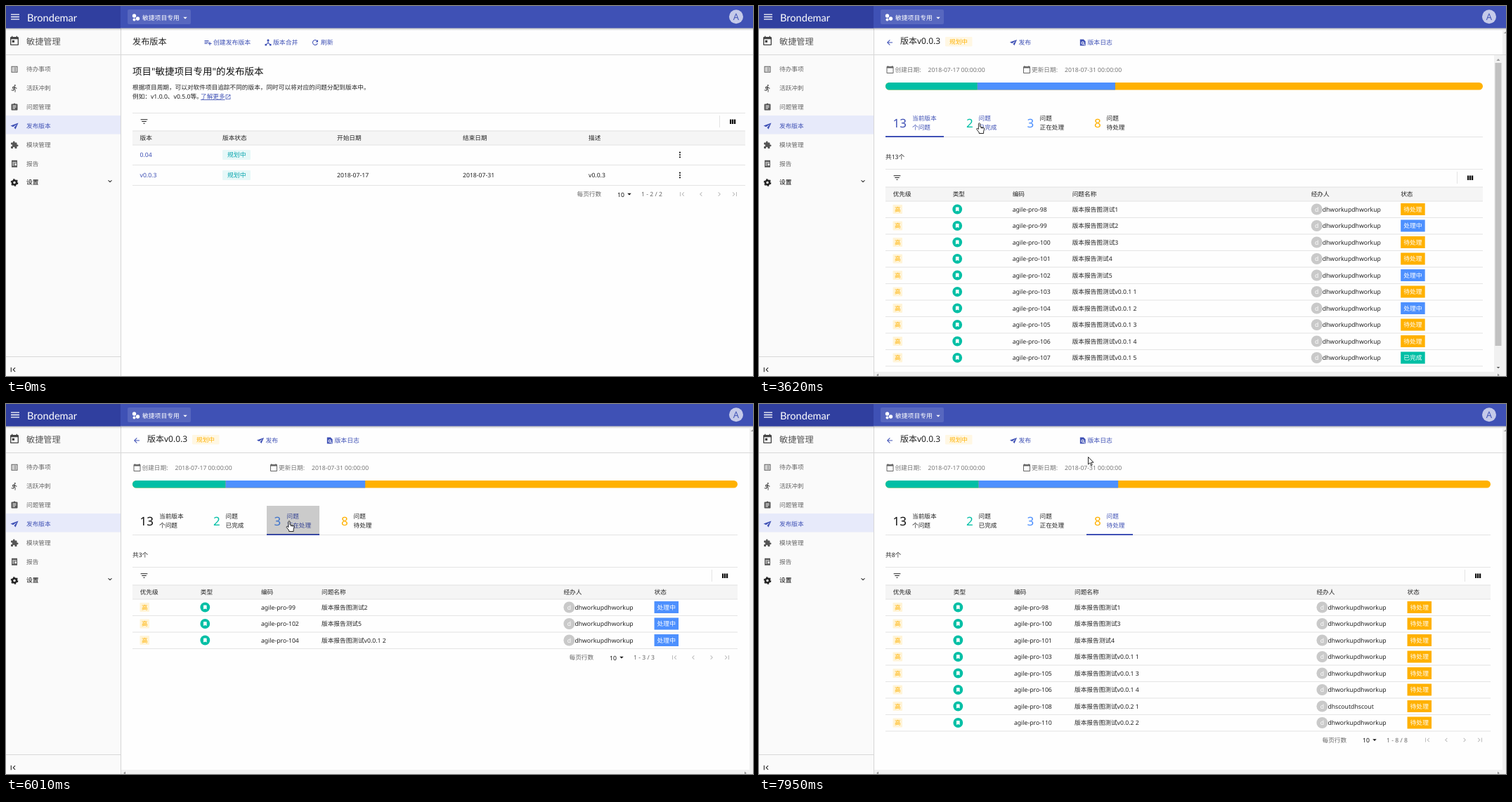
Animation of 1063 by 527 pixels, one loop 8000 ms. Source, as an HTML page:

```html
<!DOCTYPE html>
<html lang="zh-CN">
<head>
<meta charset="utf-8">
<title>发布版本</title>
<style>
html, body { margin: 0; width: 100%; height: 100%; overflow: hidden; background: #fff; }
svg { display: block; width: 1063px; height: 527px; }
text { font-family: "Noto Sans", "Noto Sans CJK SC", "Noto Sans CJK", sans-serif; text-rendering: geometricPrecision; white-space: pre; }
.brand { font-family: Lato, sans-serif; }
</style>
</head>
<body>
<svg id="stage" viewBox="0 0 1063 527"></svg>
<script>
const LOOP = 8000;
const BLUE = '#3f51b5', GREEN = '#00bfa5', SKY = '#4d90fe', AMBER = '#ffb100';
const INK = '#222', GREY = '#666', LINE = '#e4e4e4', OFF = '#bdbdbd';

const ICON = {
  menu: 'M3 18h18v-2H3zM3 13h18v-2H3zM3 6v2h18V6z',
  today: 'M19 3h-1V1h-2v2H8V1H6v2H5c-1.1 0-2 .9-2 2v14c0 1.1.9 2 2 2h14c1.1 0 2-.9 2-2V5c0-1.1-.9-2-2-2zm0 16H5V8h14zM7 10h5v5H7z',
  calendar: 'M20 3h-1V1h-2v2H7V1H5v2H4c-1.1 0-2 .9-2 2v16c0 1.1.9 2 2 2h16c1.1 0 2-.9 2-2V5c0-1.1-.9-2-2-2zm0 18H4V8h16z',
  list: 'M3 3h18v18H3zM5 5v14h14V5zM11 7h6v2h-6zM11 11h6v2h-6zM11 15h6v2h-6zM7 7h2v2H7zM7 11h2v2H7zM7 15h2v2H7z',
  run: 'M13.5 5.5c1.1 0 2-.9 2-2s-.9-2-2-2-2 .9-2 2 .9 2 2 2zm-3.6 13.9l1-4.4 2.1 2v6h2v-7.5l-2.1-2 .6-3c1.3 1.5 3.3 2.5 5.5 2.5v-2c-1.9 0-3.5-1-4.3-2.4l-1-1.6c-.4-.6-1-1-1.7-1-.3 0-.5.1-.8.1L6 8.3V13h2V9.600l1.800-.7-1.600 8.100-4.900-1-.4 2z',
  task: 'M19 3h-4c-.6-1.200-1.700-2-3-2s-2.400.8-3 2H5c-1.100 0-2 .9-2 2v14c0 1.100.9 2 2 2h14c1.100 0 2-.9 2-2V5c0-1.100-.9-2-2-2zM14 17H7v-2h7zM17 13H7v-2h10zM17 9H7V7h10z',
  plane: 'M1 11L23 3 15 21 11 16.500 19 7 8 14.500z',
  puzzle: 'M20.500 11H19V7c0-1.100-.9-2-2-2h-4V3.500a2.500 2.500 0 0 0-5 0V5H4c-1.100 0-2 .9-2 2v3.800h1.500a2.700 2.700 0 0 1 0 5.400H2V20c0 1.100.9 2 2 2h3.800v-1.500a2.700 2.700 0 0 1 5.400 0V22H17c1.100 0 2-.9 2-2v-4h1.500a2.500 2.500 0 0 0 0-5z',
  report: 'M4 2h16v20H4zM6 7v2h12V7zM6 11v2h5v-2zM6 15v2h5v-2zM13 11v6h5v-6z',
  filter: 'M10 18h4v-2h-4zM3 6v2h18V6zM6 13h12v-2H6z',
  columns: 'M4 5h4.500v13H4zM10 5h4.500v13H10zM16 5h4.500v13H16z',
  add: 'M14 10H2v2h12zM14 6H2v2h12zM18 14v-4h-2v4h-4v2h4v4h2v-4h4v-2zM2 16h8v-2H2z',
  merge: 'M17 16l-4-4V8.800a3 3 0 1 0-2 0V12l-4 4H3v5h5v-3l4-4.200 4 4.200v3h5v-5z',
  refresh: 'M17.600 6.400A8 8 0 1 0 19.700 14h-2.100A6 6 0 1 1 16.200 7.800L13 11h7V4z',
  back: 'M20 11H7.800l5.600-5.600L12 4l-8 8 8 8 1.400-1.400L7.800 13H20z',
  open: 'M19 19H5V5h7V3H3v18h18v-9h-2zM14 3v2h3.600L7.800 14.800l1.400 1.400L19 6.400V10h2V3z',
  first: 'M18.400 16.600L13.800 12l4.600-4.600L17 6l-6 6 6 6zM6 6h2v12H6z',
  last: 'M5.600 7.400L10.200 12l-4.600 4.600L7 18l6-6-6-6zM16 6h2v12h-2z',
  prev: 'M15.400 7.400L14 6l-6 6 6 6 1.400-1.400L10.800 12z',
  next: 'M10 6L8.600 7.400 13.200 12l-4.600 4.600L10 18l6-6z',
  expand: 'M16.600 8.600L12 13.200 7.400 8.600 6 10l6 6 6-6z',
  drop: 'M6 9l6 6 6-6z',
  mark: 'M17 3H7c-1.100 0-2 .9-2 2v16l7-3 7 3V5c0-1.100-.9-2-2-2z',
  log: 'M4 2h11l6 6v14H4zM12 9a4.500 4.500 0 1 0 2.500 8.200L18 20.500l1.400-1.400-3.300-3.300A4.500 4.500 0 0 0 12 9zM12 11a2.500 2.500 0 1 1 0 5 2.500 2.500 0 0 1 0-5z'
};

// Markup helpers; text and icons are placed by their vertical centre.
const rect = (x, y, w, h, fill, rx = 0) =>
  `<rect x="${x}" y="${y}" width="${w}" height="${h}" fill="${fill}" rx="${rx}"/>`;
const text = (x, cy, s, fill = INK, size = 8.67, attrs = '') =>
  `<text x="${x}" y="${cy + size * .37}" fill="${fill}" font-size="${size}" ${attrs}>${s}</text>`;
const dot = (x, y, r, fill) => `<circle cx="${x}" cy="${y}" r="${r}" fill="${fill}"/>`;
const icon = (name, cx, cy, size, fill) =>
  `<path d="${ICON[name]}" fill="${fill}" fill-rule="evenodd" transform="translate(${cx - size / 2} ${cy - size / 2}) scale(${size / 24})"/>`;
const center = 'text-anchor="middle"';

function frame() {
  const items = [['list', '待办事项'], ['run', '活跃冲刺'], ['task', '问题管理'], ['plane', '发布版本'],
    ['puzzle', '模块管理'], ['report', '报告']];
  const nav = items.map(([name, label], i) => {
    const y = 90 + i * 26.9, on = i === 3;
    return icon(name, 12, y + .3, 12, on ? BLUE : '#555') + text(29, y, label, on ? BLUE : GREY);
  }).join('');
  const gear = `<g fill="none" stroke="${INK}"><circle cx="12" cy="251.500" r="3" stroke-width="2.600"/>
    <circle cx="12" cy="251.500" r="4.600" stroke-width="1.500" stroke-dasharray="2.400"/></g>`;
  return rect(0, 32, 163, 495, '#fafafa') + rect(0, 156, 163, 26.500, '#e7eafa')
    + icon('today', 12, 50, 16, '#444') + text(29, 50, '敏捷管理', '#555', 12.200)
    + nav + gear + text(29, 251, '设置', '#000') + icon('expand', 148, 249.500, 11, '#000')
    + rect(0, 499, 163, 1, '#d8d8d8') + icon('first', 10, 518, 13, '#222')
    + rect(163, 32, 1, 495, '#d6d6d6') + rect(0, 69, 1063, 1, '#d8d8d8')
    + rect(0, 31, 1063, 4, 'url(#shade)') + rect(0, 0, 1063, 31.500, BLUE) + rect(0, 0, 163, 31.500, '#303f9f')
    + icon('menu', 13, 15.500, 16, '#fff') + text(30, 16.500, 'Brondemar', '#fff', 14.600, 'class="brand"')
    + rect(173, 5, 90, 21, '#5767bf', 2)
    + dot(182.500, 14, 2.700, '#fff') + dot(182.500, 19.500, 2, '#fff') + dot(187.500, 18, 2.700, '#fff')
    + text(194, 16.500, '敏捷项目专用', '#fff', 8.800) + icon('drop', 255, 17, 11, '#fff')
    + dot(1039, 15.300, 10, '#c5cae9') + text(1039, 15.300, 'A', '#4759b8', 13, center);
}

function toolbar(right, cy) {
  return rect(180, cy - 13, right - 180, 1, LINE) + icon('filter', 196.500, cy - .5, 13, '#222')
    + rect(right - 37, cy - 9, 1, 17, LINE) + icon('columns', right - 18, cy, 12, '#111')
    + rect(180, cy + 12.500, right - 180, 20.500, '#f5f5f5')
    + rect(180, cy + 12.500, right - 180, 1, LINE) + rect(180, cy + 32.500, right - 180, 1, LINE);
}

function pager(right, cy, n, stale) {
  const x = right - 1052, fwd = stale ? '#222' : OFF;
  return text(x + 812.500, cy, '每页行数', GREY) + text(x + 870, cy + .5, '10', '#111') + icon('drop', x + 887, cy, 11, '#111')
    + text(x + 904, cy, `1 - ${n} / ${n}`, GREY)
    + icon('first', x + 962, cy, 12, OFF) + icon('prev', x + 989, cy, 12, OFF)
    + icon('next', x + 1015, cy, 12, fwd) + icon('last', x + 1037, cy, 12, fwd);
}

function versions() {
  const cols = [190.500, 308, 471, 650, 829];
  const row = (cy, cells) => cells.map((s, i) => i === 1
    ? rect(308, cy - 7, 40, 14, 'rgba(0,191,190,.09)', 1) + text(315, cy, s, '#0aa5ae', 8.900)
    : text(cols[i], cy, s, i ? INK : BLUE)).join('')
    + [-3.300, 0, 3.300].map(d => dot(959, cy + d, 1.100, '#111')).join('')
    + rect(180, cy + 14, 872, 1, LINE);
  return text(180, 50.500, '发布版本', '#222', 12.200)
    + icon('add', 287.500, 52, 12, BLUE) + text(295, 51.500, '创建发布版本', BLUE, 8.900)
    + icon('merge', 373, 52, 12, BLUE) + text(380, 51.500, '版本合并', BLUE, 8.900)
    + icon('refresh', 440, 52, 12, BLUE) + text(448, 51.500, '刷新', BLUE, 8.900)
    + text(180, 93, '项目"敏捷项目专用"的发布版本', '#111', 13.500)
    + text(180, 115.500, '根据项目周期，可以对软件项目追踪不同的版本，同时可以将对应的问题分配到版本中。')
    + text(180, 129, '例如：v1.0.0、v0.5.0等。') + text(277, 129, '了解更多', BLUE, 8.670, 'text-decoration="underline"')
    + icon('open', 316, 129.500, 9, BLUE)
    + toolbar(1052, 165)
    + ['版本', '版本状态', '开始日期', '结束日期', '描述'].map((s, i) => text(cols[i], 188, s)).join('')
    + rect(180, 227, 872, 28, '#f4f4f4').replace('<rect', '<rect id="hover"')
    + row(212, ['0.04', '规划中']) + row(241, ['v0.0.3', '规划中', '2018-07-17', '2018-07-31', 'v0.0.3'])
    + rect(190.500, 244.500, 22, .8, BLUE).replace('<rect', '<rect id="underline"')
    + pager(1052, 268, 2);
}

const STATUS = { todo: ['待处理', AMBER], doing: ['处理中', SKY], done: ['已完成', GREEN] };
const issueList = Array.from({ length: 13 }, (_, i) => {
  const kind = [1, 4, 6].includes(i) ? 'doing' : [9, 11].includes(i) ? 'done' : 'todo';
  const tail = i < 3 ? '图测试' + (i + 1) : i < 5 ? '测试' + (i + 1)
    : i < 10 ? `图测试v0.0.1 ${i - 4}` : `图测试v0.0.2 ${Math.min(i - 9, 2)}`;
  return { code: 'agile-pro-' + (98 + i), title: '版本报告' + tail, kind,
    user: i === 10 ? 'dhscoutdhscout' : 'dhworkupdhworkup' };
});
const ofKind = kind => issueList.filter(it => it.kind === kind);

function issues(right, rows, total = rows.length, stale = false) {
  const w = right - 180, col = [0, .1, .2, .3, .7, .85].map(f => 190.700 + f * w);
  const a = w * 2 / 13, b = w * 5 / 13;
  const body = rows.map((it, i) => {
    const y = 289.500 + i * 23.500, [label, tint] = STATUS[it.kind];
    return rect(190.500, y - 6.500, 13.500, 13, '#fff4d8', 1) + text(193, y, '高', AMBER)
      + dot(col[1] + 6.500, y, 6.900, GREEN) + icon('mark', col[1] + 6.500, y, 8, '#fff')
      + text(col[2], y, it.code) + text(col[3], y, it.title)
      + dot(col[4] + 8, y, 8, '#c9c9c9') + text(col[4] + 8, y, 'd', '#fff', 8.670, center) + text(col[4] + 16, y, it.user)
      + rect(col[5], y - 8.500, 34.500, 17, tint) + text(col[5] + 17.200, y, label, '#fff', 8.800, center + ' font-weight="500"')
      + rect(180, y + 11.500, w, 1, LINE);
  }).join('');
  const scroll = right > 1035 ? '' : rect(1046, 70, 12, 451, '#f1f1f1') + rect(1047.500, 81, 9, 403, '#c1c1c1')
    + icon('drop', 1052, 515, 9, '#555') + `<path d="M1049.500 78h5l-2.500-3z" fill="#999"/>`;
  return rect(180, 109, w, 10.500, AMBER, 5.200)
    + `<path d="M${180 + a} 109H185.200a5.250 5.250 0 0 0 0 10.500H${180 + a}z" fill="${GREEN}"/>`
    + rect(180 + a, 109, b - a, 10.500, SKY) + rect(180, 186, w, 1, LINE)
    + text(180, 215, `共${total}个`) + toolbar(right, 245)
    + ['优先级', '类型', '编码', '问题名称', '经办人', '状态'].map((s, i) => text(col[i], 268, s)).join('')
    + body + (rows.length ? pager(right, 278 + rows.length * 23.500 + 12.500, rows.length, stale) : '')
    + scroll + rect(164, 521, 894, 6, '#f0f0f0')
    + `<path d="M167 526l3-2.500v3.500zM1054 526l-3-2.500v3.500z" fill="#888"/>`
    + rect(1058, 35, 5, 492, '#f1f1f1') + `<path d="M1059.500 39h3.500v-2.500z" fill="#999"/>`;
}

const tabs = [
  { x: 180, w: 83, n: 13, nx: 190.500, lx: 218, lines: ['当前版本', '个问题'], tint: '#111' },
  { x: 284, w: 66.500, n: 2, nx: 295, lx: 312.500, lines: ['问题', '已完成'], tint: GREEN, hover: 3140, click: 4180 },
  { x: 371, w: 75, n: 3, nx: 381.500, lx: 399.500, lines: ['问题', '正在处理'], tint: SKY, hover: 5120, click: 5590 },
  { x: 466, w: 66, n: 8, nx: 477, lx: 494.500, lines: ['问题', '待处理'], tint: AMBER, hover: 6420, click: 6690 }
];

function detail() {
  const date = (x, label, value) => icon('calendar', x, 90.500, 12, '#666')
    + text(x + 7, 90.500, label, '#777') + text(x + 54, 90.500, value, '#777', 8.600);
  return icon('back', 186, 52, 12, BLUE) + text(201, 50, '版本v0.0.3', '#222', 12)
    + rect(265, 44, 38.500, 13.500, '#fff7e3', 1) + text(271, 51, '规划中', AMBER)
    + icon('plane', 362, 52, 11, BLUE) + text(369.500, 51.500, '发布', BLUE, 8.900)
    + icon('log', 460.500, 52, 11, BLUE) + text(467.500, 51.500, '版本日志', BLUE, 8.900)
    + date(186.500, '创建日期:', '2018-07-17 00:00:00') + date(381, '更新日期:', '2018-07-31 00:00:00')
    + tabs.map(t => text(t.nx, 167, t.n, t.tint, 17, 'class="num"')
      + `<g class="label">${text(t.lx, 160, t.lines[0], 'inherit')}${text(t.lx, 172.500, t.lines[1], 'inherit')}</g>`).join('')
    + `<rect id="ink" y="185" height="2" fill="${BLUE}"/><rect id="ripple" y="145" height="41" fill="#000"/>
      <path id="spin" d="M611.500 187A8 8 0 1 0 612.300 193" fill="none" stroke="#5468cc" stroke-width="2"/>`;
}

const scenes = [
  [0, versions()],
  [2300, issues(1030, [])],
  [2550, issues(1030, issueList.slice(0, 10), 13)],
  [4540, issues(1041, ofKind('done'), 2, true)],
  [4700, issues(1041, ofKind('done'))],
  [5950, issues(1041, ofKind('doing'))],
  [7040, issues(1041, ofKind('todo'))]
];

const stage = document.getElementById('stage');
stage.innerHTML = `<defs><linearGradient id="shade" x2="0" y2="1">
  <stop stop-color="#000" stop-opacity=".28"/><stop offset="1" stop-color="#000" stop-opacity="0"/></linearGradient></defs>
  ${rect(0, 0, 1063, 527, '#fefefe')}
  ${scenes.map(s => `<g class="scene">${s[1]}</g>`).join('')}
  <g id="detail">${detail()}</g>${frame()}
  <g id="cursor" stroke="#111" stroke-width=".9" stroke-linejoin="round" fill="#fff">
    <path id="arrow" d="M.5.5V11l2.400-2.200L4.600 12.500l1.600-.7L4.600 8.200H8z"/>
    <path id="hand" transform="translate(-4.500 0)" d="M3.400 1.400q1.100-1.600 2.200 0V6l4.800 1.200q1.400.4 1.100 2L10.600 13v2.500H4.200V14L.7 9.600q-.1-1.700 1.500-1.200l1.200 1.200zM7.300 6.500v2M9.200 7v1.700"/>
  </g>`;
const $ = id => document.getElementById(id);
const sceneEls = stage.querySelectorAll('.scene');
const nums = stage.querySelectorAll('.num'), labels = stage.querySelectorAll('.label');

// Pointer moves: start time, end time, x, y.
const moves = [[130, 350, 572, 399], [510, 660, 317, 278], [830, 960, 201, 245], [1360, 1440, 204, 243],
  [2500, 2560, 203, 243], [2900, 3010, 263, 231], [3070, 3140, 313.500, 166], [5050, 5120, 403, 166],
  [6310, 6380, 490, 167], [6470, 6530, 501.500, 169], [7700, 7950, 468, 75]];
const handTimes = [[930, 2350], [3130, 7770]];

const clamp = v => Math.max(0, Math.min(1, v));
const mix = (a, b, k) => a + (b - a) * k;
const show = (el, on) => { el.style.visibility = on ? 'visible' : 'hidden'; };

function drawCursor(t) {
  let x = 912, y = 520;
  for (const [from, to, tx, ty] of moves) {
    const k = clamp((t - from) / (to - from));
    x = mix(x, tx, k);
    y = mix(y, ty, k);
  }
  const hand = handTimes.some(([from, to]) => t >= from && t < to);
  $('cursor').setAttribute('transform', `translate(${x} ${y})`);
  show($('arrow'), t >= 130 && !hand);
  show($('hand'), hand);
}

function drawTabs(t) {
  let active = 0, x = tabs[0].x, w = tabs[0].w, ripple = 0, pressed = tabs[1];
  tabs.forEach((tab, i) => {
    if (!i || t < tab.click) return;
    const dt = t - tab.click, k = 1 - (1 - clamp((dt - 70) / 260)) ** 3;
    if (dt >= 70) active = i;
    x = mix(x, tab.x, k);
    w = mix(w, tab.w, k);
    ripple = .2 * clamp(dt / 160) * (1 - clamp((dt - 450) / 170));
    pressed = tab;
  });
  tabs.forEach((tab, i) => {
    const lit = i === active || (t >= tab.hover && t < tab.click);
    labels[i].setAttribute('fill', lit ? BLUE : '#222');
  });
  nums[0].setAttribute('fill', active ? '#111' : BLUE);
  $('ink').setAttribute('x', x);
  $('ink').setAttribute('width', w);
  $('ripple').setAttribute('x', pressed.x);
  $('ripple').setAttribute('width', pressed.w);
  $('ripple').setAttribute('opacity', ripple);

  const busy = t < 2860 || tabs.some(tab => t >= tab.click + 70 && t < tab.click + 340);
  $('spin').setAttribute('opacity', busy ? 1 : 0);
  $('spin').setAttribute('transform', `rotate(${(t - 2690) * .36} 604.800 190.300)`);
}

function render(t) {
  const at = scenes.filter(s => s[0] <= t).length - 1;
  sceneEls.forEach((el, i) => { el.style.display = i === at ? '' : 'none'; });
  $('detail').style.display = at ? '' : 'none';
  $('hover').setAttribute('opacity', clamp((t - 900) / 300));
  $('underline').setAttribute('opacity', t >= 930 ? 1 : 0);
  drawTabs(t);
  drawCursor(t);
}

const start = performance.now();
function tick() {
  render((performance.now() - start) % LOOP);
  requestAnimationFrame(tick);
}
tick();
</script>
</body>
</html>
```
